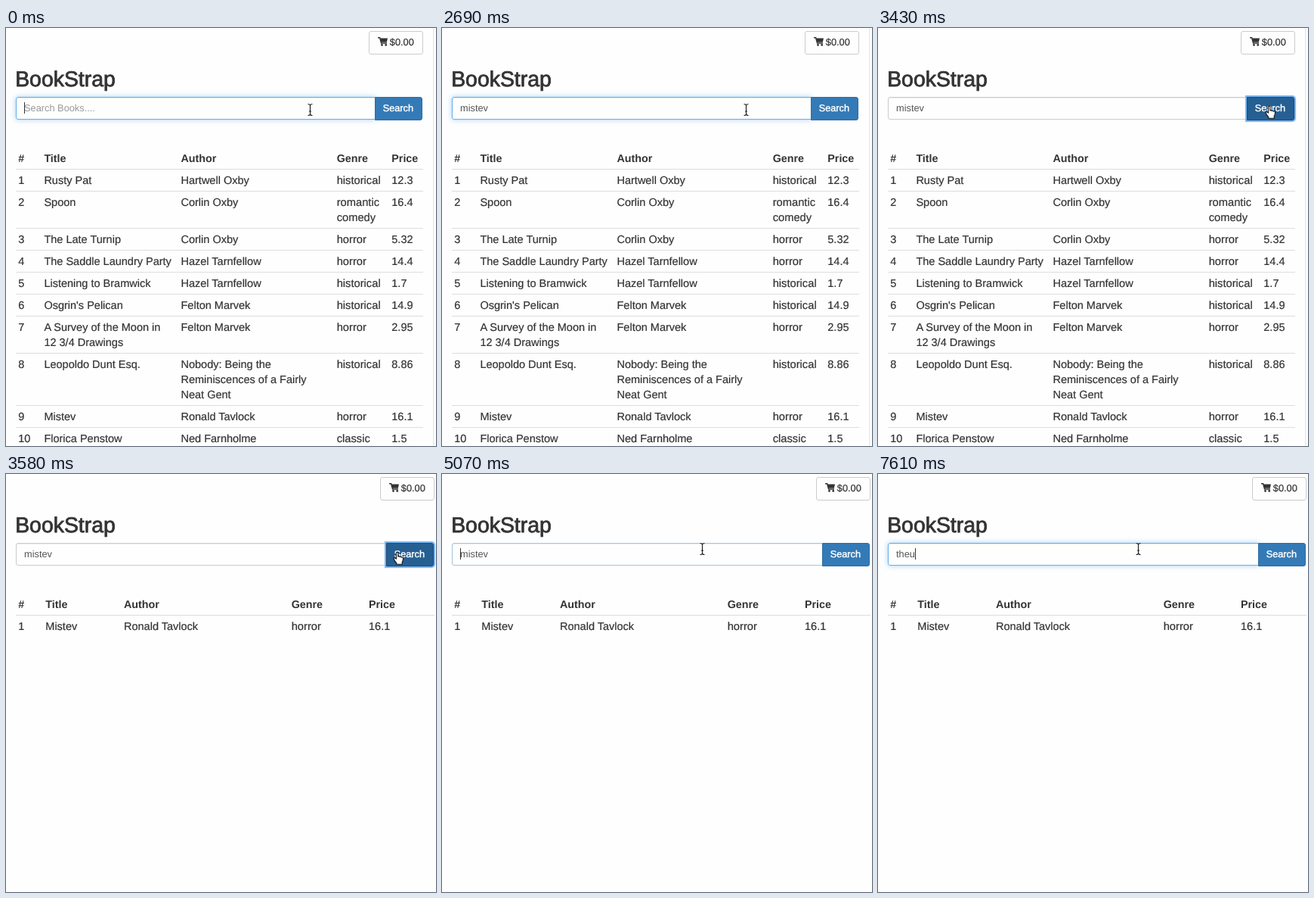
Write an HTML page that moves like this. It is 569 px wide and 552 px high and loops after 8000 ms.

```html
<!DOCTYPE html>
<html lang="en">
<head>
<meta charset="utf-8">
<title>BookStrap</title>
<style>
  html, body { margin: 0; width: 100%; height: 100%; overflow: hidden; background: #fefefe; }
  #stage { position: relative; width: 569px; height: 552px; overflow: hidden; background: #fefefe; }
  #stage > * { position: absolute; box-sizing: border-box; }
  svg { left: 0; top: 0; }
  text { font-family: "Liberation Sans", Arial, sans-serif; font-size: 14.5px; fill: #333; white-space: pre;
    stroke: #333; stroke-width: .2px; text-rendering: geometricPrecision; }
  .head { font-weight: bold; font-size: 14.3px; stroke: none; }
  .genre { font-size: 14.7px; }
  .small { font-size: 12.8px; }
  .title { font-size: 28.4px; stroke-width: .8px; }
  .label { fill: #fff; stroke: #fff; stroke-width: .4px; font-size: 12.7px; }
  .rule { stroke: #ddd; }
  #query { stroke: none; }
  #field { left: 13px; top: 91px; height: 30px; border: 1px solid #ccc; border-radius: 3px 0 0 3px;
    box-shadow: inset 0 1px 1px rgba(0,0,0,.075); }
  #field.waking { border-color: #a3c4de; }
  #field.focus { border-color: #66afe9;
    box-shadow: inset 0 1px 1px rgba(0,0,0,.075), 0 0 7px rgba(102,175,233,.6); }
  #button { top: 91px; width: 63px; height: 31px; border: 1px solid #2e6da4; border-radius: 0 3px 3px 0; background: #337ab7; }
  #button.hover { background: #286090; border-color: #204d74; }
  #button.focus { background: #265f92; border-color: #1f4a70; box-shadow: 0 0 1px 2px #74b2f2; }
  #cart { top: 4px; width: 72px; height: 31px; border: 1px solid #ccc; border-radius: 3px; }
  #edge { left: 565px; top: 0; width: 4px; height: 552px; border-left: 1px solid #e7e7e7; background: #fbfbfb; }
</style>
</head>
<body>
<div id="stage">
  <div id="edge"></div>
  <div id="cart"></div>
  <div id="field"></div>
  <div id="button"></div>
  <svg width="569" height="552" viewBox="0 0 569 552">
    <text class="title" x="12.2" y="77">BookStrap</text>
    <g id="right">
      <path d="M492 12.8h2.6l2 7.2h7.4" fill="none" stroke="#333" stroke-width="1.5"/>
      <path d="M495 13.4h10l-1.2 5.4h-7.4z" fill="#333"/>
      <circle cx="497.5" cy="22.4" r="1.4" fill="#333"/>
      <circle cx="502.7" cy="22.4" r="1.4" fill="#333"/>
      <text class="small" x="507.8" y="23">$0.00</text>
      <text class="label" x="498.8" y="110">Search</text>
    </g>
    <rect id="selection" x="24" y="98" height="16" fill="#b3d7fe"/>
    <text id="query" class="small" x="24" y="110"></text>
    <rect id="caret" y="98" width="1" height="15" fill="#333"/>
    <g id="catalog"></g>
    <g id="results"></g>
    <g id="pointer">
      <path id="beam" d="M-3-7.5q3 0 3 2q0-2 3-2M0-5.5V5.5M-3 7.5q3 0 3-2q0 2 3 2M-1.5 2h3"
        fill="none" stroke="#222" stroke-width="1.2"/>
      <path id="arrow" d="M0 0V13.2L3 10.4L5.2 15.4L7.6 14.4L5.4 9.6H9.6Z" fill="#111" stroke="#fff"/>
      <path id="hand" d="M-2.6 1V-6.2q0-1.5 1.2-1.5t1.2 1.5V-2q2-.9 2.4.5q2-.8 2.4.6q1.9-.5 2 1.2
        q0 3-1.4 5V8.3H-2.2V6.6Q-5.6 3-6 .7q.3-1.6 1.9-.6Z" fill="#fff" stroke="#111" stroke-width="1.1"/>
    </g>
  </svg>
</div>
<script>
const LOOP = 8000;
const $ = id => document.getElementById(id);

function add(parent, tag, attrs, content = '') {
  const node = document.createElementNS('http://www.w3.org/2000/svg', tag);
  for (const key in attrs) node.setAttribute(key, attrs[key]);
  node.textContent = content;
  parent.append(node);
}

// Cells hold lines separated by "|"; a row is as tall as its longest cell.
function buildTable(parent, columns, right, rows) {
  const head = ['#', 'Title', 'Author', 'Genre', 'Price'];
  let top = 157.5;
  [head, ...rows.map((row, i) => [String(i + 1), ...row])].forEach((cells, r) => {
    let lines = 1;
    cells.forEach((cell, c) => {
      const parts = cell.split('|');
      lines = Math.max(lines, parts.length);
      const style = r === 0 ? 'head' : c === 3 ? 'genre' : '';
      parts.forEach((part, i) =>
        add(parent, 'text', { x: columns[c], y: top + 19.5 + 20 * i, class: style }, part));
    });
    top += 9 + 20 * lines;
    if (r === 0 || rows.length > 1)
      add(parent, 'path', { d: `M13 ${top}H${right}`, class: 'rule' });
  });
}

const books = [
  ['Rusty Pat', 'Hartwell Oxby', 'historical', '12.3'],
  ['Spoon', 'Corlin Oxby', 'romantic|comedy', '16.4'],
  ['The Late Turnip', 'Corlin Oxby', 'horror', '5.32'],
  ['The Saddle Laundry Party', 'Hazel Tarnfellow', 'horror', '14.4'],
  ['Listening to Bramwick', 'Hazel Tarnfellow', 'historical', '1.7'],
  ["Osgrin's Pelican", 'Felton Marvek', 'historical', '14.9'],
  ['A Survey of the Moon in|12 3/4 Drawings', 'Felton Marvek', 'horror', '2.95'],
  ['Leopoldo Dunt Esq.', 'Nobody: Being the|Reminiscences of a Fairly|Neat Gent', 'historical', '8.86'],
  ['Mistev', 'Ronald Tavlock', 'horror', '16.1'],
  ['Florica Penstow', 'Ned Farnholme', 'classic', '1.5']
];
buildTable($('catalog'), [16.3, 50.4, 231.5, 437.7, 510.3], 552, books);
buildTable($('results'), [16.3, 52.3, 156, 377.7, 480], 567, [books[8]]);

// Each step changes only what it names.
const steps = [
  [0, { text: '', caret: 'end', selected: false, found: false, field: 'focus', button: '', pointer: ['beam', 402.5, 108] }],
  [150, { caret: '' }],
  [600, { caret: 'end' }],
  [1040, { caret: '' }],
  [1190, { text: 'm', caret: 'end' }],
  [1340, { text: 'mi' }],
  [1490, { text: 'mis' }],
  [1640, { text: 'mist' }],
  [1940, { text: 'miste' }],
  [2090, { text: 'mistev' }],
  [2690, { caret: '' }],
  [2840, { pointer: ['beam', 452, 97] }],
  [2980, { pointer: ['arrow', 533, 41] }],
  [3130, { pointer: ['arrow', 529, 72] }],
  [3280, { pointer: ['hand', 519, 111], button: 'hover' }],
  [3430, { button: 'focus', field: '' }],
  [3580, { found: true }],
  [4470, { pointer: ['beam', 420, 103] }],
  [4620, { pointer: ['beam', 344.5, 99] }],
  [5070, { caret: 'start', field: 'waking', button: '' }],
  [5220, { caret: '', selected: true, field: 'focus' }],
  [5970, { text: '', caret: 'end', selected: false }],
  [6570, { caret: '' }],
  [7020, { caret: 'end' }],
  [7310, { text: 'th' }],
  [7460, { text: 'the' }],
  [7610, { text: 'theu' }]
];

let state = {};
const timeline = steps.map(([at, change]) => ({ at, state: state = { ...state, ...change } }));

const show = (id, on) => { $(id).style.display = on ? '' : 'none'; };

function render(s) {
  const shift = s.found ? 15 : 0;
  show('catalog', !s.found);
  show('results', s.found);
  show('edge', !s.found);
  $('right').setAttribute('transform', `translate(${shift})`);
  $('cart').style.left = 480 + shift + 'px';
  $('button').style.left = 488 + shift + 'px';
  $('field').style.width = 476 + shift + 'px';
  $('field').className = s.field;
  $('button').className = s.button;

  const query = $('query');
  query.textContent = s.text || 'Search Books....';
  query.style.fill = s.text ? '#555' : '#999';
  const width = s.text ? Math.round(query.getComputedTextLength()) : 0;
  $('caret').setAttribute('x', s.caret === 'end' ? 24 + width : 24);
  $('selection').setAttribute('width', width);
  show('caret', s.caret);
  show('selection', s.selected);

  const [kind, x, y] = s.pointer;
  $('pointer').setAttribute('transform', `translate(${x} ${y})`);
  for (const id of ['beam', 'arrow', 'hand']) show(id, id === kind);
}

const start = performance.now();
let current;
function tick() {
  const time = (performance.now() - start) % LOOP;
  const step = timeline.findLast(entry => entry.at <= time);
  if (step !== current) render((current = step).state);
  requestAnimationFrame(tick);
}
tick();
</script>
</body>
</html>
```
